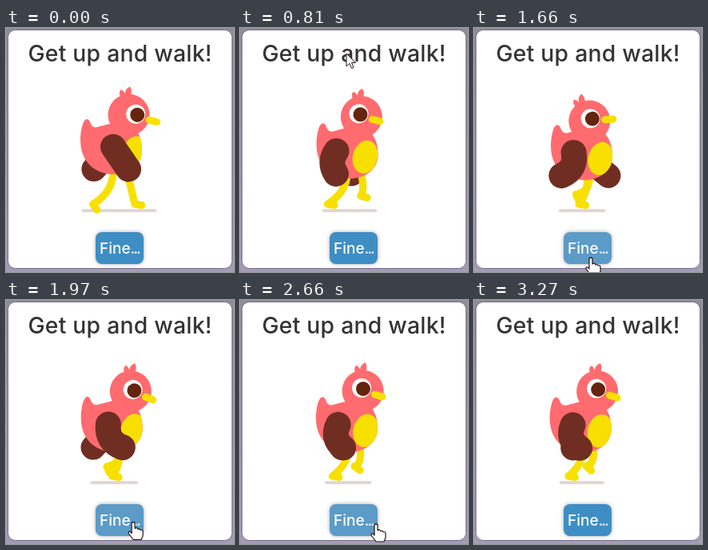
Recreate the animation shown at these times as an HTML page. Size 285 px wide and 306 px high, loop 3.35 s.

```html
<!DOCTYPE html>
<html lang="en">
<head>
<meta charset="utf-8">
<title>Get up and walk!</title>
<style>
  html, body { margin: 0; width: 100%; height: 100%; overflow: hidden; }
  svg { display: block; }
  text { font-family: Inter, "Open Sans", sans-serif; font-weight: 500; }
  .round { fill: none; stroke-linecap: round; stroke-linejoin: round; }
  .pink { fill: #ff6b6f; }
  .wing { stroke: #702e23; }
  .leg { stroke: #f7e000; stroke-width: 9.3; }
  .cursor { fill: #fff; stroke: #2a1515; stroke-linejoin: round; }
  #button { filter: drop-shadow(0 0 2.5px #0005); }
</style>
</head>
<body>
<svg width="285" height="306" viewBox="0 0 285 306">
  <defs>
    <linearGradient id="wall" x2="0" y2="1">
      <stop stop-color="#918d97"/><stop offset="1" stop-color="#a49cb5"/>
    </linearGradient>
    <path id="shape" d="M105 121C110 123 107 131 116 131L150 122C168 130 173 145 173 160C173 180 155 190 138 190C112 190 96 172 96 148C96 136 99 119 105 121Z"/>
    <clipPath id="inside"><use href="#shape"/></clipPath>
  </defs>
  <rect width="285" height="306" fill="url(#wall)"/>
  <rect x="2.5" y="2.5" width="280" height="299" rx="9" fill="#fff" stroke="#747188"/>
  <text x="142.5" y="42" font-size="28.3" letter-spacing=".25" fill="#333" text-anchor="middle">Get up and walk!</text>

  <path id="shadow" class="round" stroke="#e3d6d4" stroke-width="4"/>
  <path id="farWing" class="round wing" stroke-width="31"/>
  <path id="legA" class="round leg"/>
  <path id="legB" class="round leg"/>
  <g id="body">
    <use href="#shape" class="pink"/>
    <g clip-path="url(#inside)">
      <ellipse id="belly" rx="15.5" ry="21" fill="#f7e000"/>
    </g>
  </g>
  <g id="head">
    <circle class="pink" r="26"/>
    <path class="pink" transform="translate(-9 -24) rotate(-14)" d="M-7 4C-10 -1 -9 -4 -7 -6C-4 -5 -3 -3 -2 -1C-2 -5 0 -8 4 -10C7 -7 6 -2 6 3Z"/>
    <g id="face">
      <circle cy="-3" r="12" fill="#fff"/>
      <circle cx="2.2" cy="-2.5" r="9" fill="#64250c"/>
      <path class="round" stroke="#f7e000" stroke-width="9" d="M18 0H28"/>
    </g>
  </g>
  <path id="nearWing" class="round wing" stroke-width="32"/>

  <rect id="button" x="112" y="256" width="60" height="40" rx="8"/>
  <text x="117" y="283" font-size="19" fill="#fff">Fine<tspan letter-spacing="-2">...</tspan></text>
  <path id="arrow" class="cursor" d="M0 0V16L4 12.5L6.5 18.5L9 17.5L6.5 11.5H11.5Z"/>
  <path id="hand" class="cursor" stroke-width="1.2" d="M-2 1Q0 -1 2 1V8Q5 6 6 9Q9 8 9 10Q12 9 12 12V17L10 22H0L-6 14Q-6 11 -4 12L-2 14Z"/>
</svg>
<script>
const LOOP = 3350, STEP = 76.67, STRIDE_PER_STEP = .1228;
const { sin, cos, max, PI } = Math;

// step, x, y of the pointer tip
const pointer = [
  [1, 235, 290], [8, 100, 70], [9, 56, 45], [11, 133, 32], [17, 142, 215],
  [22, 146, 288], [30, 172.2, 269], [35, 170, 281], [38, 225, 300]
];

const el = id => document.getElementById(id);
const set = (id, attrs) => {
  for (const key in attrs) el(id).setAttribute(key, attrs[key]);
};

// The foot sweeps back along the ground, then lifts and swings forward
function drawLeg(id, phase) {
  const reach = cos(2 * PI * (phase + .07));
  const lift = max(0, -sin(2 * PI * phase));
  const curl = max(0, -sin(2 * PI * (phase + .13)));
  const hipX = 143 + 10 * reach;
  const heelX = 135 + 29 * reach - 12 * lift, heelY = 221 - 13 * lift;
  const kneeX = (hipX + heelX) / 2 + 6 - 6 * reach + 5 * lift;
  const toe = (8 + 65 * curl) * PI / 180;
  set(id, { d: `M${hipX} 182Q${kneeX} 206 ${heelX} ${heelY}l${8.5 * cos(toe)} ${8.5 * sin(toe)}` });
}

function drawBird(phase) {
  const wave = peak => cos(2 * PI * (phase - peak));
  const dip = sin(2 * PI * phase) ** 2;      // the bird sinks twice per stride

  const mid = 141.5 - 7 * dip, half = 45 - 19.5 * dip;
  set("shadow", { d: `M${mid - half} 229H${mid + half}` });

  drawLeg("legA", phase);
  drawLeg("legB", phase + .5);

  const bodyX = -1 - 2 * wave(.05), bodyY = 8 * dip - 6.5;
  set("body", { transform: `translate(${bodyX} ${bodyY})` });
  set("belly", { transform: `translate(${159.5 + 4.5 * wave(0)} 163) rotate(14)` });

  const headX = 150 + 6 * wave(.15), headY = 107.5 + 9 * dip + 2 * wave(.87);
  set("head", { transform: `translate(${headX} ${headY}) rotate(${8 + 13 * wave(.17)})` });
  set("face", { transform: `translate(${1.5 + 7 * wave(.95)} 0)` });

  // Wings swing in opposition; the near one flexes as it moves
  const tipY = 177 + 9 * dip;
  set("farWing", { d: `M134 ${156 + bodyY}L${139 - 36 * wave(.1)} ${tipY}` });
  const x = 126 + 8 * wave(.98), y = 149 + 8 * dip;
  const dx = 127 + 28 * wave(.06) - x, dy = tipY - y;
  const flex = -.42 * sin(2 * PI * phase);
  set("nearWing", { d: `M${x} ${y}q${dx / 2 + flex * dy} ${dy / 2 - flex * dx} ${dx} ${dy}` });
}

function pointerAt(step) {
  const next = pointer.findIndex(p => p[0] > step);
  const [s0, x0, y0] = pointer[next - 1], [s1, x1, y1] = pointer[next];
  const p = (step - s0) / (s1 - s0);
  return [x0 + (x1 - x0) * p, y0 + (y1 - y0) * p];
}

function drawPointer(step) {
  const shown = step >= 1 && step < 38;
  const [x, y] = shown ? pointerAt(step) : [0, 0];
  const near = x > 108 && x < 176 && y > 256;
  const over = near && x < 172 && y < 296;
  const transform = `translate(${x} ${y})`;
  set("arrow", { transform, visibility: shown && !near ? "visible" : "hidden" });
  set("hand", { transform, visibility: near ? "visible" : "hidden" });
  set("button", { fill: over ? "#5c9bc7" : "#3e8ec4" });
}

function frame(now) {
  const t = now % LOOP;
  const step = t < 70 ? 0 : Math.floor((t + 34) / STEP);
  drawBird(step * STRIDE_PER_STEP);
  drawPointer(step);
  requestAnimationFrame(frame);
}
frame(0);
</script>
</body>
</html>
```
